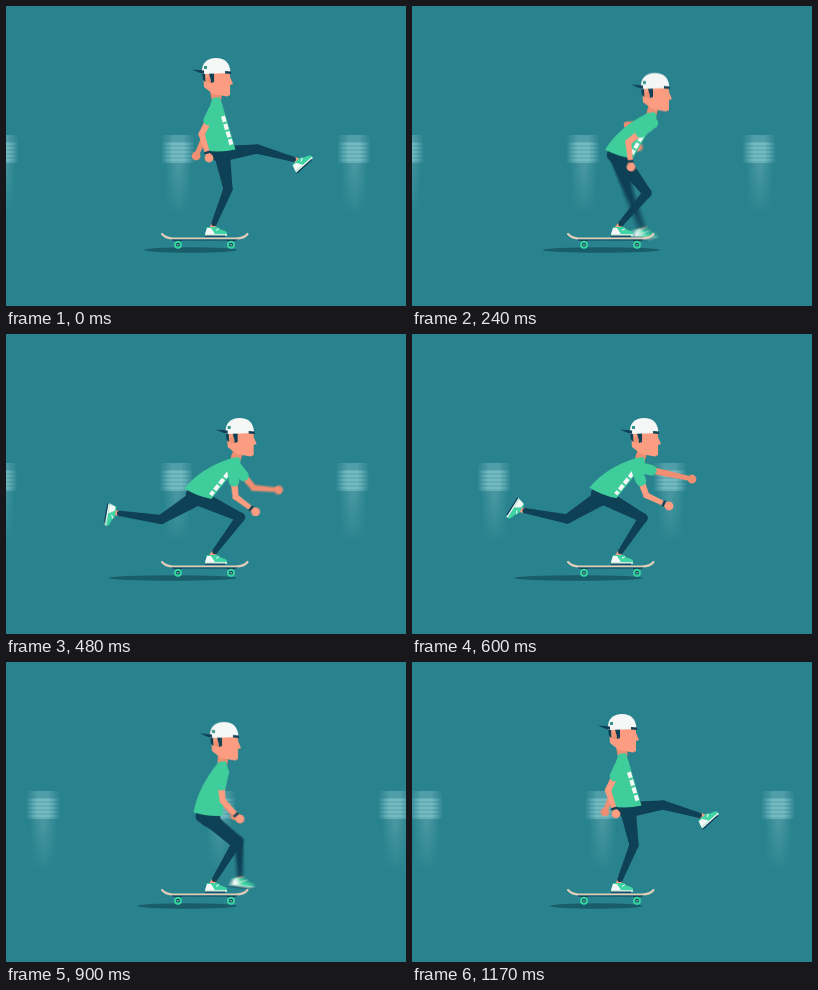
These frames come from a looping animation (400x300 px, 1200 ms). An HTML page with a canvas:

```html
<!DOCTYPE html>
<html lang="en">
<head>
<meta charset="utf-8">
<title>Skater</title>
<style>
  html, body { margin: 0; width: 100%; height: 100%; overflow: hidden; background: #28838e; }
  canvas { display: block; width: 400px; height: 300px; }
</style>
</head>
<body>
<canvas id="stage" width="400" height="300"></canvas>
<script>
const W = 400, H = 300, LOOP = 1200, STEP = 30;
const NAVY = '#0d3a52', SKIN = '#fa9b7b', SKIN_FAR = '#ec8a6b';
const SHIRT = '#40c998', WHITE = '#f5f6f3', SHOE = '#40d0a0';

const out = document.getElementById('stage').getContext('2d');
const layer = () => Object.assign(document.createElement('canvas'), { width: W, height: H }).getContext('2d');
const c = layer(), blurred = layer();

// Pose keys: one value per time, interpolated without overshoot.
const TIMES = [0, 240, 300, 360, 600, 780, 900, 1170];
const TRACKS = {
  headX: [210, 243, 241, 236, 232, 229, 218, 210],
  headY: [52, 67, 76, 84, 84, 74, 60, 52],
  hipX: [215, 207, 200, 194, 191, 195, 202, 215],
  hipY: [144, 148, 154, 160, 159, 154, 152, 144],
  kneeX: [222, 235, 238, 238, 231, 234, 230, 222],
  kneeY: [183, 187, 185, 183, 184, 185, 182, 183],
  kickKneeX: [251, 217, 188, 155, 155, 198, 233, 251],
  kickKneeY: [143, 187, 194, 187, 185, 185, 179, 143],
  kickX: [290, 230, 172, 112, 110, 165, 234, 290],
  kickY: [154, 222, 227, 187, 176, 220, 215, 154],
  kickTurn: [-42, 8, 40, 60, 122, 22, 8, -42],
  nearX: [203, 219, 228, 236, 257, 248, 234, 204],
  nearY: [152, 161, 172, 181, 172, 162, 157, 152],
  farX: [190, 226, 243, 257, 280, 266, 229, 193],
  farY: [150, 141, 156, 167, 145, 153, 154, 150]
};

const N = TIMES.length;
const at = i => (i + N) % N;
const gap = i => (TIMES[at(i + 1)] - TIMES[at(i)] + LOOP) % LOOP;

function tangent(v, i) {
  const a = (v[at(i)] - v[at(i - 1)]) / gap(i - 1);
  const b = (v[at(i + 1)] - v[at(i)]) / gap(i);
  return a * b > 0 ? 2 * a * b / (a + b) : 0;
}

function pose(t) {
  t = (t + LOOP) % LOOP;
  let i = N - 1;
  while (TIMES[i] > t) i--;
  const d = gap(i), u = (t - TIMES[i]) / d, p = {};
  for (const key in TRACKS) {
    const v = TRACKS[key], a = v[i], b = v[at(i + 1)];
    const s = u * u * (3 - 2 * u);
    p[key] = a + (b - a) * s + d * u * (1 - u) * ((1 - u) * tangent(v, i) - u * tangent(v, i + 1));
  }
  return p;
}

function poly(g, color, ...pts) {
  g.fillStyle = color;
  g.beginPath();
  for (const [x, y] of pts) g.lineTo(x, y);
  g.closePath();
  g.fill();
}

function oval(g, color, x, y, rx, ry = rx, turn = 0) {
  g.fillStyle = color;
  g.beginPath();
  g.ellipse(x, y, rx, ry, turn, 0, 7);
  g.fill();
}

function line(g, color, width, ...pts) {
  g.strokeStyle = color;
  g.lineWidth = width;
  g.beginPath();
  for (const [x, y] of pts) g.lineTo(x, y);
  g.stroke();
}

const mix = (a, b, u) => [a[0] + (b[0] - a[0]) * u, a[1] + (b[1] - a[1]) * u];

function taper(color, a, b, ra, rb) {
  const n = Math.atan2(b[1] - a[1], b[0] - a[0]) + Math.PI / 2;
  const x = Math.cos(n), y = Math.sin(n);
  poly(c, color, [a[0] + x * ra, a[1] + y * ra], [b[0] + x * rb, b[1] + y * rb],
    [b[0] - x * rb, b[1] - y * rb], [a[0] - x * ra, a[1] - y * ra]);
  oval(c, color, ...a, ra);
  oval(c, color, ...b, rb);
}

function shoe([x, y], degrees) {
  c.save();
  c.translate(x, y);
  c.rotate(degrees * Math.PI / 180);
  c.fillStyle = SHOE;
  c.beginPath();
  c.moveTo(-6, 1);
  c.lineTo(4, 1);
  c.quadraticCurveTo(8, 4, 12, 5);
  c.quadraticCurveTo(15, 6, 14, 9);
  c.lineTo(-8, 9);
  c.closePath();
  c.fill();
  poly(c, WHITE, [-6, 2], [-2, 2], [2, 8], [-8, 8]);
  line(c, WHITE, 1, [3, 4.5], [6, 2.5]);
  line(c, WHITE, 1.5, [-8, 9], [14, 9]);
  line(c, NAVY, 1.2, [-8, 10.2], [12, 10.2]);
  c.restore();
}

function leg(hip, knee, ankle, turn) {
  line(c, SKIN, 5, mix(knee, ankle, .85), mix(knee, ankle, 1.08));
  shoe(ankle, turn);
  taper(NAVY, hip, knee, 8, 4.6);
  taper(NAVY, knee, mix(knee, ankle, .93), 4.6, 2.7);
}

function arm(color, from, hand, watch) {
  const upper = 26, fore = 25;
  const dx = hand[0] - from[0], dy = hand[1] - from[1];
  const d = Math.hypot(dx, dy), r = Math.min(d, upper + fore);
  const along = (upper * upper - fore * fore + r * r) / (2 * r);
  const off = Math.sqrt(Math.max(0, upper * upper - along * along));
  const elbow = [from[0] + (dx * along - dy * off) / d, from[1] + (dy * along + dx * off) / d];
  taper(color, from, elbow, 3.6, 3);
  taper(color, elbow, hand, 3, 2.3);
  oval(c, color, ...hand, 4.4);
  if (watch) line(c, NAVY, 6, mix(elbow, hand, .72), mix(elbow, hand, .82));
  taper(SHIRT, from, mix(from, elbow, .4), 5.5, 5.2);
}

function head(x, y) {
  c.save();
  c.translate(x, y);
  poly(c, SKIN, [-13, 14], [14, 14], [14, 19], [17, 26], [14, 27], [14, 37], [11, 38.5], [-3, 36], [-12, 29]);
  poly(c, NAVY, [-14, 15], [-11, 15], [-10.5, 24], [-13, 22]);
  poly(c, NAVY, [-7, 15], [-2, 15], [-2, 24], [-5, 25]);
  oval(c, SKIN_FAR, -7.5, 22, 2.2, 3);
  c.fillStyle = WHITE;
  c.beginPath();
  c.moveTo(-14, 16);
  c.bezierCurveTo(-15, 5, -9, 0, 0, 0);
  c.bezierCurveTo(9, 0, 14, 5, 14.5, 15);
  c.closePath();
  c.fill();
  poly(c, NAVY, [-24, 11.5], [-12, 12.5], [-12, 16], [-17, 14.5]);
  poly(c, NAVY, [9, 13], [15, 13.5], [15, 16], [9, 15.5]);
  c.fillStyle = '#2c8f82';
  c.fillRect(-12, 8, 3, 3);
  c.restore();
}

function torso(neck, hip, lean) {
  const tilt = lean * .45, hx = Math.cos(tilt) * 14.5, hy = Math.sin(tilt) * 14.5;
  const back = [hip[0] - hx, hip[1] - hy], front = [hip[0] + hx, hip[1] + hy];
  const bulge = mix([neck[0] - 4, neck[1]], back, .55);
  const chest = [neck[0] + 5, neck[1] + 4];
  c.fillStyle = SHIRT;
  c.beginPath();
  c.moveTo(neck[0] - 4, neck[1]);
  c.quadraticCurveTo(bulge[0] - 5 * Math.cos(lean) - 2, bulge[1] - 9 * Math.sin(lean), ...back);
  c.quadraticCurveTo(hip[0], hip[1] + 3, ...front);
  c.lineTo(...chest);
  c.lineTo(neck[0] + 3, neck[1] - 1);
  c.closePath();
  c.fill();
  return [chest, front];
}

function lettering([chest, front]) {
  const inset = ([x, y]) => [x - 3, y - 1];
  c.setLineDash([6, 2]);
  line(c, WHITE, 4, inset(mix(chest, front, .32)), inset(mix(chest, front, .92)));
  c.setLineDash([]);
}

function board() {
  c.lineCap = 'round';
  c.strokeStyle = '#ddc8b8';
  c.lineWidth = 2.2;
  c.beginPath();
  c.moveTo(156, 228);
  c.quadraticCurveTo(160, 232.5, 167, 232.5);
  c.lineTo(230, 232.5);
  c.quadraticCurveTo(238, 232.5, 241.5, 228);
  c.stroke();
  c.lineCap = 'butt';
  line(c, NAVY, 1, [166, 234], [231, 234]);
  for (const x of [172, 225]) {
    poly(c, NAVY, [x - 4, 234], [x + 4, 234], [x + 1, 238], [x - 1, 238]);
    oval(c, '#35d09c', x, 238.7, 4);
    oval(c, NAVY, x, 238.7, 1.9);
    oval(c, '#bfe9d8', x, 238.7, .8);
  }
}

function skater(t) {
  const p = pose(t);
  const hip = [p.hipX, p.hipY], joint = [p.hipX + 1, p.hipY + 4];
  const neck = [p.headX - .09 * (p.headX - p.hipX), p.headY + 40];
  const lean = Math.atan2(neck[0] - hip[0], hip[1] - neck[1]);
  c.clearRect(0, 0, W, H);
  arm(SKIN_FAR, [neck[0] + 1, neck[1] + 10], [p.farX, p.farY]);
  leg([joint[0] - 2, joint[1]], [p.kickKneeX, p.kickKneeY], [p.kickX, p.kickY], p.kickTurn);
  board();
  leg(joint, [p.kneeX, p.kneeY], [207, 220], 0);
  oval(c, NAVY, hip[0], hip[1] + 3, 12.5, 8, lean * .45);
  taper(SKIN_FAR, [p.headX - 1, p.headY + 32], neck, 5, 5);
  const edge = torso(neck, hip, lean);
  if (t < 840 || t > 960) lettering(edge);
  head(p.headX, p.headY);
  arm(SKIN, [neck[0] - 3, neck[1] + 13], [p.nearX, p.nearY], true);
}

function post(x) {
  for (let k = -4; k <= 4; k++) {
    const dx = x + k * 1.3;
    out.fillStyle = 'rgba(205,232,234,.027)';
    out.fillRect(dx - 11, 129, 22, 28);
    out.fillStyle = 'rgba(205,232,234,.02)';
    out.fillRect(dx - 11, 136, 22, 21);
    for (let y = 137; y < 157; y += 4) out.fillRect(dx - 12, y, 24, 2);
    const fade = out.createLinearGradient(0, 157, 0, 212);
    fade.addColorStop(0, 'rgba(190,225,228,.026)');
    fade.addColorStop(1, 'rgba(190,225,228,0)');
    out.fillStyle = fade;
    out.fillRect(dx - 7, 157, 15, 55);
  }
}

function dust(f) {
  const age = f - 11;
  if (age < 0 || age > 4) return;
  const x = 114 - (age - 1) * 9, s = 1 - Math.abs(age - 1) * .2;
  out.save();
  out.filter = 'blur(1px)';
  out.globalAlpha = .8 * s;
  oval(out, '#d8eaec', x - 3, 221, 5 * s);
  oval(out, '#e8f3f3', x + 3, 228, 6 * s);
  oval(out, '#c4dfe2', x - 2, 227, 5 * s);
  out.restore();
}

function draw(f) {
  const t = f * STEP, samples = 7, shutter = 16;
  out.fillStyle = '#28838e';
  out.fillRect(0, 0, W, H);

  const first = (172 - 22.1 * f) % 176;
  for (let x = first - 176; x < W + 40; x += 176) post(x);

  const foot = pose(t).kickX;
  const left = 98 + 40 * Math.sqrt(Math.max(0, foot - 108) / 182);
  const right = f > 6 && f < 10 ? 248 : 231;
  oval(out, '#195d6b', (left + right) / 2, 244, (right - left) / 2, 2.7);
  dust(f);

  // Average several sub-steps for motion blur.
  blurred.globalCompositeOperation = 'source-over';
  blurred.clearRect(0, 0, W, H);
  blurred.globalCompositeOperation = 'lighter';
  blurred.globalAlpha = 1 / samples;
  for (let i = 0; i < samples; i++) {
    skater(t + (i / (samples - 1) - .5) * shutter);
    blurred.drawImage(c.canvas, 0, 0);
  }
  out.drawImage(blurred.canvas, 0, 0);
}

let shown = -1;
const start = performance.now();
function tick() {
  const f = Math.floor((performance.now() - start) % LOOP / STEP);
  if (f !== shown) draw(shown = f);
  requestAnimationFrame(tick);
}
tick();
</script>
</body>
</html>
```
